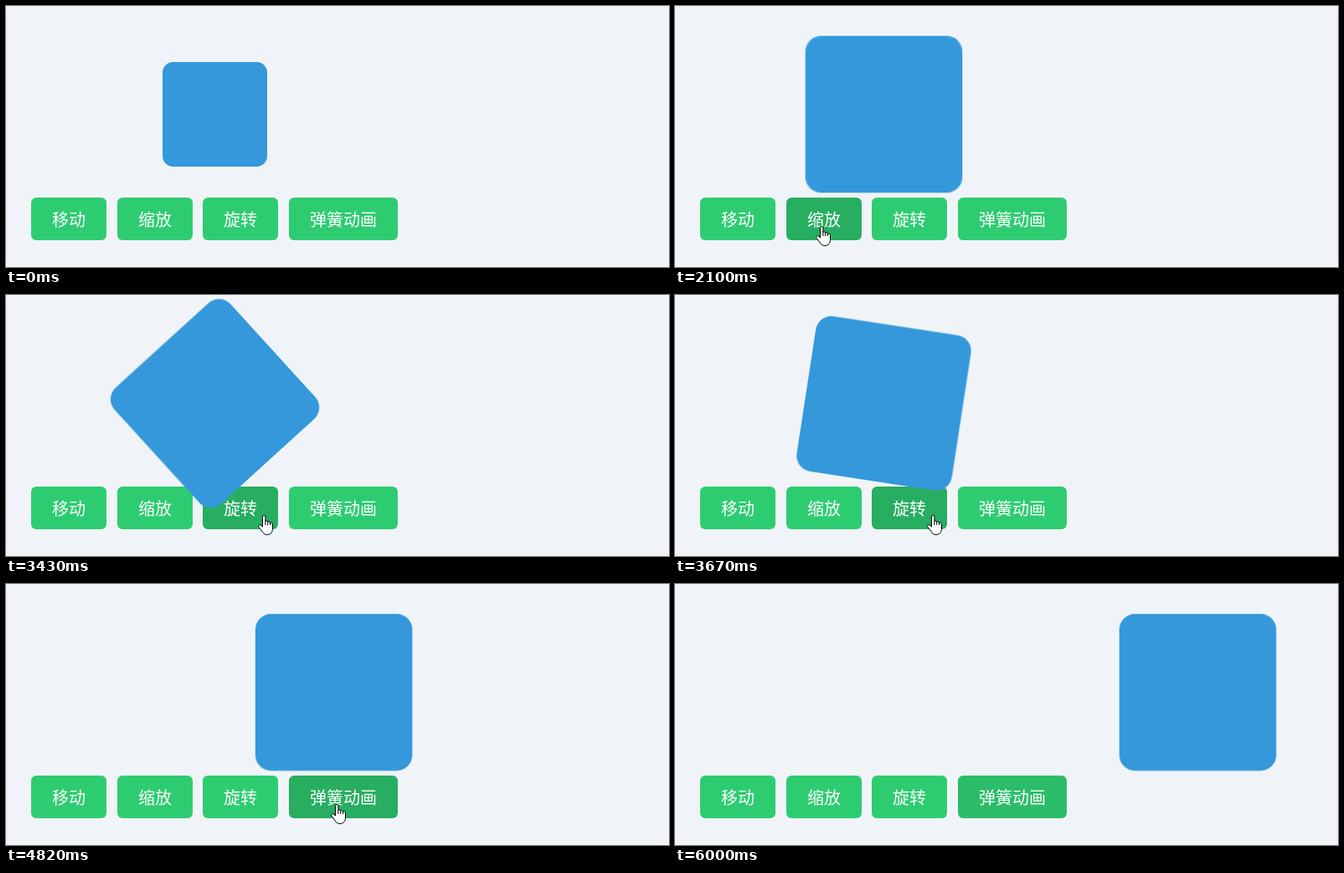
Write an HTML page that moves like this. It is 792x312 px and loops after 7.8 s.

```html
<!DOCTYPE html>
<html lang="zh">
<head>
<meta charset="utf-8">
<title>弹簧动画</title>
<style>
  html, body { margin: 0; width: 100%; height: 100%; overflow: hidden; background: #f0f4f8; }
  .stage { position: relative; width: 792px; height: 312px; overflow: hidden; }
  .stage * { animation: 7.8s linear infinite; }

  .btn {
    position: absolute; top: 229px; width: 90px; height: 51px;
    border-radius: 6.25px; background: #2ecc71; color: #fff;
    font: 20px/51px "Noto Sans CJK SC", "Noto Sans CJK", sans-serif;
    text-align: center; white-space: nowrap;
  }
  .move { left: 30px; }
  .scale { left: 133px; animation-name: hover-scale; }
  .rotate { left: 235px; animation-name: hover-rotate; }
  .spring { left: 338px; width: 130px; animation-name: hover-spring; }

  .box {
    position: absolute; left: 187px; top: 67px; width: 125px; height: 125px;
    border-radius: 12.5px; background: #3498db;
    animation-name: grow, turn, slide;
  }

  .cursor { position: absolute; left: 0; top: 0; animation-name: path; }
  .cursor svg { position: absolute; top: 0; overflow: visible; fill: #fff; stroke: #000; stroke-linejoin: round; }
  .hand { left: -6px; animation-name: show-hand; animation-timing-function: step-end; }
  .arrow { left: 0; animation-name: show-arrow; animation-timing-function: step-end; }

  /* Percentages are milliseconds / 78. */
  @keyframes grow {
    0% { scale: 1; }
    20.192% { scale: 1; animation-timing-function: ease; }
    26.603%, 100% { scale: 1.5; }
  }
  @keyframes turn {
    0% { rotate: 0deg; }
    38.462% { rotate: 0deg; animation-timing-function: ease-in-out; }
    51.282%, 100% { rotate: 360deg; }
  }
  @keyframes slide {
    0% { translate: 0; }
    60.897% { translate: 0; animation-timing-function: ease; }
    64.744%, 100% { translate: 375px; }
  }

  @keyframes hover-scale {
    0% { background: #2ecc71; }
    4.487% { background: #2ecc71; animation-timing-function: ease; }
    8.333% { background: #27ae60; }
    33.474% { background: #27ae60; animation-timing-function: ease; }
    37.321%, 100% { background: #2ecc71; }
  }
  @keyframes hover-rotate {
    0% { background: #2ecc71; }
    33.808% { background: #2ecc71; animation-timing-function: ease; }
    37.654% { background: #27ae60; }
    55.603% { background: #27ae60; animation-timing-function: ease; }
    59.449%, 100% { background: #2ecc71; }
  }
  /* The loop ends halfway through the last fade. */
  @keyframes hover-spring {
    0% { background: #2ecc71; }
    56.038% { background: #2ecc71; animation-timing-function: ease; }
    59.885% { background: #27ae60; }
    75.808% { background: #27ae60; }
    76.923%, 100% { background: #2bbd69; }
  }

  @keyframes path {
    0%, 1.923% { translate: 162px 298px; }
    4.487% { translate: 167px 279px; animation-timing-function: ease-out; }
    7.692% { translate: 174px 263px; }
    31.154% { translate: 174px 263px; animation-timing-function: ease-in-out; }
    36.795% { translate: 307px 263px; }
    54.744% { translate: 307px 263px; animation-timing-function: ease-in; }
    55.385% { translate: 318px 263px; animation-timing-function: ease-out; }
    59.359% { translate: 394px 263px; }
    69.615% { translate: 394px 263px; animation-timing-function: ease-in-out; }
    72.179% { translate: 384px 263px; }
    73.333% { translate: 384px 263px; animation-timing-function: ease-in; }
    75.808% { translate: 460px 280px; }
    76.41% { translate: 510px 300px; }
    76.795%, 100% { translate: 545px 313px; }
  }
  @keyframes show-hand {
    0%, 33.474%, 55.603%, 75.808%, 100% { opacity: 0; }
    4.487%, 33.808%, 56.038% { opacity: 1; }
  }
  @keyframes show-arrow {
    0%, 4.487%, 33.808%, 56.038%, 76.795%, 100% { opacity: 0; }
    1.923%, 33.474%, 55.603%, 75.808% { opacity: 1; }
  }
</style>
</head>
<body>
<div class="stage">
  <div class="btn move">移动</div>
  <div class="btn scale">缩放</div>
  <div class="btn rotate">旋转</div>
  <div class="btn spring">弹簧动画</div>
  <div class="box"></div>
  <div class="cursor">
    <svg class="hand" width="18" height="24">
      <path d="M5.5 14V2.2a1.7 1.7 0 0 1 3.4 0V7.2q2.4-1 2.8.8q2.4-.8 2.8 1q2.8-.6 3 1.6V16c0 4.5-2.2 7.5-6.5 7.5c-3.5 0-5-1.8-6.5-4.5L1 14.4c-1-1.8.8-3.4 2.6-2z"/>
      <path fill="none" d="M8.9 7v5M11.7 8v4M14.5 9v3"/>
    </svg>
    <svg class="arrow" width="12" height="19">
      <path d="M.5.7v15.8l3.6-3.4 2.4 5.4 2.4-1-2.3-5.4h4.9z"/>
    </svg>
  </div>
</div>
</body>
</html>
```
